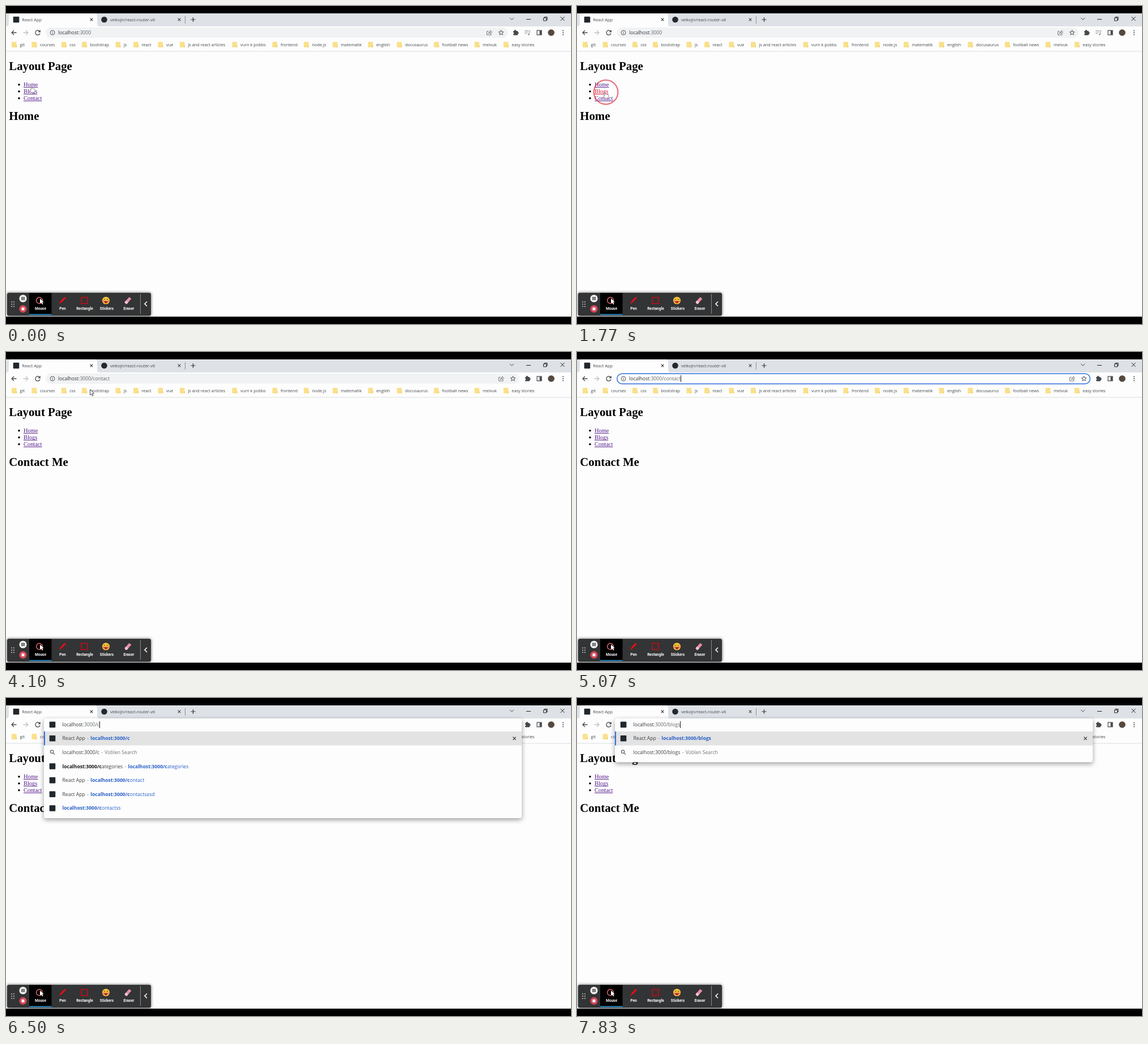
An HTML page with a canvas that plays this animation: 998 by 561 pixels, repeating every 8000 ms.

```html
<!DOCTYPE html>
<html lang="en">
<head>
<meta charset="utf-8">
<title>Router demo</title>
<style>
  html, body { margin: 0; width: 100%; height: 100%; overflow: hidden; background: #000; }
  canvas { display: block; width: 998px; height: 561px; }
</style>
</head>
<body>
<canvas id="stage" width="998" height="561"></canvas>
<script>
const ctx = document.getElementById('stage').getContext('2d');
const LOOP = 8000;
const UI = '"Open Sans", "Noto Sans", sans-serif';
const SERIF = '"Liberation Serif", serif';
const DARK = '#3c4043', GRAY = '#6f7377', BLUE = '#2a60c8', INK = '#45484c';
const HOST = 'localhost:3000/';

// ---------- helpers ----------
function text(s, x, y, size, color, weight = 400, family = UI) {
  ctx.font = `${weight} ${size}px ${family}`;
  ctx.fillStyle = color;
  ctx.fillText(s, x, y);
  return x + ctx.measureText(s).width;
}
function rect(x, y, w, h, color) {
  ctx.fillStyle = color;
  ctx.fillRect(x, y, w, h);
}
function round(x, y, w, h, r, color) {
  ctx.beginPath();
  ctx.roundRect(x, y, w, h, r);
  ctx.fillStyle = color;
  ctx.fill();
}
function disc(x, y, r, color) {
  ctx.beginPath();
  ctx.arc(x, y, r, 0, 7);
  ctx.fillStyle = color;
  ctx.fill();
}
function stroke(d, color, width = 1, x = 0, y = 0) {
  ctx.save();
  ctx.translate(x, y);
  ctx.strokeStyle = color;
  ctx.lineWidth = width;
  ctx.stroke(new Path2D(d));
  ctx.restore();
}
function shape(d, x, y, fill, line) {
  ctx.save();
  ctx.translate(x, y);
  const p = new Path2D(d);
  ctx.fillStyle = fill;
  ctx.fill(p);
  if (line) {
    ctx.strokeStyle = line;
    ctx.lineWidth = 0.8;
    ctx.stroke(p);
  }
  ctx.restore();
}
function ring(x, y, r, color, width = 1) {
  ctx.beginPath();
  ctx.arc(x, y, r, 0, 7);
  ctx.strokeStyle = color;
  ctx.lineWidth = width;
  ctx.stroke();
}
const cross = (x, y, r, color, w = 1) =>
  stroke(`M${-r} ${-r}L${r} ${r}M${r} ${-r}L${-r} ${r}`, color, w, x, y);
const favicon = (x, y) => round(x - 5.3, y - 5.3, 10.6, 10.6, 1, '#20272d');

// ---------- timeline ----------
const clicks = [[700, 46, 140, 0], [1770, 51, 152, 1], [3370, 52, 163, 2]];
const BLOGS_AT = 1900, CONTACT_AT = 3500, FOCUS_AT = 4260, CARET_AT = 5000;

const path = [
  [0, 45, 141], [1100, 45, 141], [1270, 49.5, 151], [2530, 49.5, 151],
  [2630, 51, 164], [3660, 51, 164], [4080, 148.5, 66], [4200, 148.5, 66], [4270, 152, 47]
];

const edits = [
  [5530, 'contac'], [5730, 'conta'], [5900, 'cont'], [6070, 'con'], [6230, 'co'],
  [6390, 'c'], [6630, ''],
  [7070, 'b'], [7250, 'bl'], [7430, 'blo'], [7590, 'blog'], [7720, 'blogs']
];

const sites = [
  { path: 'blo', icon: 'globe' },
  { path: 'blog', title: 'Blog | Torka Belın', icon: 'square' },
  { path: 'categories', title: HOST + 'categories' },
  { path: 'contact', title: 'React App' },
  { path: 'contactsasd', title: 'React App' },
  { path: 'contactss' }
];

function pointer(t) {
  let i = path.length - 1;
  while (path[i][0] > t) i--;
  const a = path[i], b = path[i + 1] || a;
  const k = b === a ? 0 : (t - a[0]) / (b[0] - a[0]);
  const e = k * k * (3 - 2 * k);
  return [a[1] + (b[1] - a[1]) * e, a[2] + (b[2] - a[2]) * e];
}

// ---------- browser frame ----------
function tabStrip() {
  rect(0, 13, 998, 23, '#dee1e6');
  shape('M1 36Q5 36 5 31V18Q5 13 10 13H156Q161 13 161 18V31Q161 36 165 36Z', 0, 0, '#fdfdfd');
  favicon(18, 24);
  text('React App', 28.3, 26.7, 7.45, INK);
  cross(151, 24, 2.3, '#333', 1.1);
  disc(173.5, 24, 5.3, '#24292f');
  text('velkoJn/react-router-v6', 184, 26.7, 7.45, INK);
  cross(306, 24, 2.3, '#444', 1.1);
  rect(316, 18, 1, 13, '#8d9196');
  stroke('M-4 0H4M0 -4V4', '#333', 1.2, 330.5, 24);
  stroke('M-3.5 -1.7L0 1.8L3.5 -1.7', '#444', 1, 893.5, 22.5);
  stroke('M-4 0H4', '#222', 1, 923, 23.5);
  stroke('M-3 -1.5H2V3.5H-3ZM-1.5 -1.5V-3H3.5V2H2', '#222', 1, 952.5, 22.5);
  cross(983, 22.5, 3.5, '#222', 1);
}

function star(x, y) {
  let d = '';
  for (let i = 0; i < 10; i++) {
    const r = i % 2 ? 2 : 4.6, a = i * Math.PI / 5;
    d += (i ? 'L' : 'M') + (r * Math.sin(a)) + ' ' + (-r * Math.cos(a));
  }
  stroke(d + 'Z', '#4a4d51', 1, x, y);
}

function drawUrl(x, tail) {
  return text(tail, text('localhost', x, 50.2, 8.65, '#303236'), 50.2, 8.65, '#63676b');
}

function toolbar(t, tail) {
  const wide = t >= BLOGS_AT, focus = t >= FOCUS_AT;
  const right = wide ? 907 : 886;
  rect(0, 36, 998, 44, '#fdfdfd');
  rect(0, 79.5, 998, 1, '#dcdee1');
  stroke('M4.5 0H-4M0 -4L-4 0L0 4', '#45484c', 1.3, 14, 47);
  stroke('M-4.5 0H4M0 -4L4 0L0 4', '#bfc2c5', 1.3, 35, 47);
  stroke('M3.6 -2A4.1 4.1 0 1 0 4 1.2M4.2 -4.5V-1.3H1', '#45484c', 1.3, 56, 47);

  round(70, 38, right - 70, 18, 9, focus ? '#fdfdfd' : '#f0f2f3');
  if (focus) {
    ctx.beginPath();
    ctx.roundRect(70.7, 38.2, right - 71.4, 18, 9);
    ctx.strokeStyle = '#2f70dc';
    ctx.lineWidth = 1.5;
    ctx.stroke();
  }
  ring(82, 47, 4, '#55585c', 1);
  rect(81.5, 46.4, 1, 2.9, '#55585c');
  rect(81.5, 44.6, 1, 1, '#55585c');

  if (focus && t < CARET_AT) rect(91.5, 41, 92.5, 12.5, '#a5c7f7');
  const end = drawUrl(92, tail);
  if (t >= CARET_AT) rect(Math.round(end), 41, 1, 12, '#222');

  const sx = right - 32.5;
  stroke('M-1 -2.5H-4V4H3.5V2M-1.5 1.5Q-1 -1.5 2 -1.6V-4L5 -1L2 2V0Q0 0 -1.5 1.5Z', '#66696d', 0.9, sx, 47);
  star(right - 11.5, 47.2);

  const px = wide ? 921 : 900;
  round(px - 4, 44, 8, 7.5, 1, '#45484c');
  disc(px - 0.6, 43.8, 1.7, '#45484c');
  disc(px + 4, 47.6, 1.7, '#45484c');
  disc(px - 4, 48, 1.3, '#fdfdfd');
  if (!wide) {
    stroke('M-5 -3.5H2M-5 -1H2M-5 1.5H-1M3.5 -3.5V2.5M3.5 -3.3H5.5', '#9a9da1', 1, 921, 47);
    disc(923.2, 50, 1.6, '#9a9da1');
  }
  stroke('M-4 -3.8H4V3.8H-4Z', '#45484c', 1.2, 942, 47);
  rect(942.5, 43.5, 3.5, 7, '#45484c');
  disc(963, 47, 5.8, '#55483f');
  for (const y of [43.5, 47, 50.5]) disc(984, y, 1, '#45484c');
}

const bookmarks = [
  ['git', 24.5], ['courses', 60], ['css', 112.3], ['bootstrap', 148.5], ['js', 208],
  ['react', 239.5], ['vue', 283], ['js and react articles', 321.5], ['vurn k pobbs', 414],
  ['frontend', 485], ['node.js', 540.5], ['matematik', 591.5], ['english', 654],
  ['docusaurus', 705], ['football news', 770.3], ['melvuk', 842], ['easy stories', 893.3]
];

function bookmarkBar() {
  for (const [label, x] of bookmarks) {
    round(x - 14.5, 63.3, 8.5, 9.8, 1, '#fae08a');
    rect(x - 6.8, 69, 1.2, 4, '#eccb62');
    text(label, x, 70.9, 7.35, INK);
  }
}

// ---------- page ----------
function page(t) {
  rect(0, 80, 998, 468, '#fdfdfd');
  const heading = t < BLOGS_AT ? 'Home' : t < CONTACT_AT ? 'Blog Articles' : 'Contact Me';
  text('Layout Page', 5.3, 113.2, 20.8, '#000', 700, SERIF);
  text(heading, 5.3, 201.2, 20.8, '#000', 700, SERIF);
  const hit = clicks.find(c => t >= c[0] && t < c[0] + 130);
  ['Home', 'Blogs', 'Contact'].forEach((label, i) => {
    const y = 142 + 12 * i, color = hit && hit[3] === i ? '#d8143a' : '#551a8b';
    disc(23, y - 3.3, 1.8, '#000');
    const end = text(label, 31, y, 10.4, color, 400, SERIF);
    rect(31, y + 1, end - 31, 0.9, color);
  });
}

// ---------- suggestions ----------
function globe(x, y) {
  disc(x, y, 4.2, '#5f6368');
  stroke('M-3 -1L-.5 .5L0 3M.5 -3L1 -1L3 0', '#fdfdfd', 1.1, x, y);
}

function rowIcon(kind, y) {
  if (kind === 'globe') globe(82, y);
  else if (kind === 'square') rect(77.5, y - 5, 10, 10, '#4fe04a');
  else if (kind === 'search') {
    ring(81, y - 1, 2.7, '#55585c', 1.1);
    stroke('M2 2L5 5', '#55585c', 1.2, 81, y - 1);
  } else favicon(82, y);
}

function matched(s, n, x, y, color, boldColor = color) {
  x = text(s.slice(0, n), x, y, 8.65, boldColor, 700);
  return text(s.slice(n), x, y, 8.65, color);
}

function separator(x, y) {
  text('-', x + 3.3, y, 8.65, GRAY);
  return x + 9.4;
}

function siteRow(site, q, cy) {
  const y = cy + 3, title = site.title;
  let x = 99.5;
  rowIcon(site.icon, cy);
  if (title) {
    const key = [HOST + q, q].find(k => k && title.toLowerCase().startsWith(k)) || '';
    x = separator(matched(title, key.length, x, y, DARK, '#17181a'), y);
  }
  matched(HOST + site.path, HOST.length + q.length, x, y, BLUE);
}

function dropdown(q) {
  const full = q[0] === 'b' ? 'blogs' : q;
  const rest = sites.filter(s => s.path.startsWith(q) && s.path !== full).slice(0, 4);
  const pitch = 24.65, count = rest.length + 2;

  ctx.save();
  ctx.shadowColor = 'rgba(0,0,0,.38)';
  ctx.shadowBlur = 8;
  ctx.shadowOffsetY = 3;
  round(67, 36, 844, 28 + pitch * count, 4, '#fdfdfd');
  ctx.restore();

  favicon(82, 47);
  const end = drawUrl(99.5, ':3000/' + q);
  if (full === q) rect(Math.round(end), 41, 1, 12, '#222');
  else {
    ctx.font = `400 8.65px ${UI}`;
    const tail = full.slice(q.length);
    rect(end, 41, ctx.measureText(tail).width, 12.5, '#9cc2f6');
    text(tail, end, 50.2, 8.65, '#4a5664');
  }

  rect(67, 59, 844, 24.6, '#e3e3e4');
  rect(67, 59, 2, 24.6, '#2f70dc');
  siteRow({ path: full, title: 'React App' }, q, 71.2);
  cross(898, 71.2, 2.6, '#333', 1.2);

  const sy = 71.2 + pitch;
  rowIcon('search', sy);
  const x = separator(text(HOST + q, 99.5, sy + 3, 8.65, DARK), sy + 3);
  text('Voblen Search', x, sy + 3, 8.65, GRAY);
  rest.forEach((s, i) => siteRow(s, q, sy + pitch * (i + 1)));
}

// ---------- recorder panel ----------
function recorder() {
  ctx.save();
  ctx.shadowColor = 'rgba(0,0,0,.65)';
  ctx.shadowBlur = 5;
  round(2, 506, 254, 40.5, 3, '#333435');
  ctx.restore();
  for (const x of [10.2, 14]) for (const y of [522, 526, 530]) disc(x, y, 1, '#c9c9c9');
  disc(30, 516, 6.6, '#f4f4f4');
  rect(27.6, 513, 1.7, 6, '#222');
  rect(30.8, 513, 1.7, 6, '#222');
  disc(30, 534.3, 6.6, '#d4475a');
  rect(27.5, 531.8, 5, 5, '#fff');

  rect(41, 506, 39.5, 39, '#000');
  rect(41, 543.5, 39.5, 1.7, '#2297d8');
  ring(59, 519.5, 5.4, '#e0686c', 1.5);
  shape('M0 0V9L2.2 7L4 10.5L5.5 9.7L3.9 6.4H6.7Z', 60, 516, '#fff');

  shape('M-6 6L-4.5 2L2.5 -5.5Q5 -7 6 -4.5L-1.5 3.5Z', 100, 519.5, '#e0101c');
  stroke('M-4 2L-1.5 4', '#8d0710', 1, 100, 519.5);
  stroke('M-5.5 -5.5H5.5V5.5H-5.5Z', '#c40d18', 1.6, 138.5, 519.5);

  disc(176.5, 519.5, 6.6, '#f6c33c');
  stroke('M-4 -1.5Q-2.6 -3.5 -1.2 -1.5M1.2 -1.5Q2.6 -3.5 4 -1.5', '#5a3512', 1, 176.5, 519.5);
  shape('M-3.5 1H3.5Q2.8 5 0 5Q-2.8 5 -3.5 1Z', 176.5, 519.5, '#b3262a');
  disc(171.8, 521, 1.5, '#ee7b5c');
  disc(181.2, 521, 1.5, '#ee7b5c');

  shape('M-6 3L2 -6L6 -3L-2 6H-4Z', 215.5, 519.5, '#e58fa6');
  shape('M-6 3L-3.5 0L.5 3.2L-2 6H-4Z', 215.5, 519.5, '#f5c3cf');

  ctx.textAlign = 'center';
  ['Mouse', 'Pen', 'Rectangle', 'Stickers', 'Eraser'].forEach((s, i) =>
    text(s, 61 + 39 * i, 536, 6.6, '#fff', 700, 'Roboto, sans-serif'));
  ctx.textAlign = 'left';
  rect(237, 508, 1, 35, '#8a8a8a');
  stroke('M2 -4L-2 0L2 4', '#fff', 1.6, 247, 525.5);
}

// ---------- pointer ----------
const ARROW = 'M0 0V10L2.3 7.9L4 11.5L5.5 10.8L3.9 7.3H7Z';
const HAND = 'M-.8 .8Q0 -.6 .8 .8V4.4Q2 3.8 2.6 4.8Q3.8 4.3 4.3 5.3Q6 5 6 6.7V8.6Q6 10 5 11.7H-.2Q-1 10 -3 7.6Q-3 6 -.8 7.4Z';

function drawPointer(t) {
  if (t >= CARET_AT) return;
  const [x, y] = pointer(t);
  if (y < 57) stroke('M-2 -5H2M0 -5V5M-2 5H2', '#333', 0.9, x, y);
  else if (x < 66 && y > 134) shape(HAND, x, y, '#fff', '#777');
  else shape(ARROW, x, y, '#fff', '#222');
}

function drawClicks(t) {
  for (const [at, x, y] of clicks) {
    const k = (t - at) / 400;
    if (k < 0 || k >= 1) continue;
    ring(x, y, 21.3 + 2.5 * k, `rgba(222,48,60,${0.68 * (1 - k)})`, 2.2);
  }
}

function draw(t) {
  rect(0, 0, 998, 561, '#000');
  page(t);
  tabStrip();
  toolbar(t, t < BLOGS_AT ? ':3000' : t < CONTACT_AT ? ':3000/blogs' : ':3000/contact');
  bookmarkBar();
  const edit = edits.filter(e => e[0] <= t).pop();
  if (edit) dropdown(edit[1]);
  recorder();
  drawPointer(t);
  drawClicks(t);
}

const start = performance.now();
function tick() {
  draw((performance.now() - start) % LOOP);
  requestAnimationFrame(tick);
}
tick();
</script>
</body>
</html>
```
